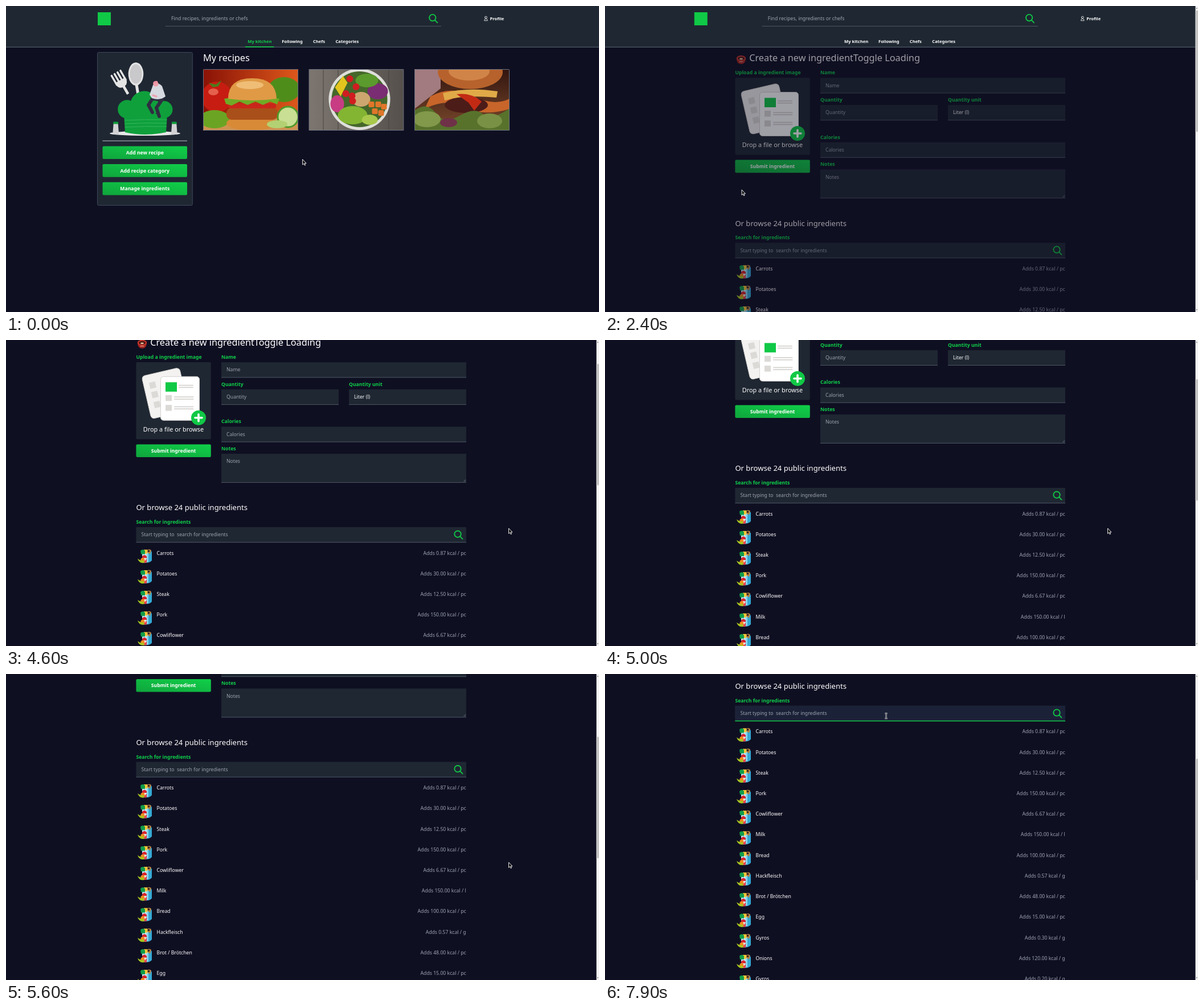
An HTML page for the animation above (8 s loop, 1041 by 538 pixels).

```html
<!DOCTYPE html>
<html lang="en">
<head>
<meta charset="utf-8">
<title>Recipe kitchen</title>
<style>
  html, body { margin: 0; width: 100%; height: 100%; overflow: hidden; background: #0f0f22; }
  #stage { display: block; width: 1041px; height: 538px; }
  text { font: 8.68px "Noto Sans", "Open Sans", sans-serif; fill: #fff; white-space: pre; }
  .bold { font-weight: 700; }
  .nav { font-weight: 700; font-size: 7.6px; }
  .label { font-weight: 700; fill: #0fd04a; }
  .muted { fill: #9ca3af; }
  .title { font-size: 16.27px; }
  .subtitle { font-size: 13.05px; }
  .drop { font-size: 10.85px; }
  .mid { text-anchor: middle; }
  .end { text-anchor: end; }
</style>
</head>
<body>
<svg id="stage" viewBox="0 0 1041 538">
  <defs>
    <linearGradient id="button" x1="0" y1="1" x2="1" y2="0">
      <stop stop-color="#0fa53c"/><stop offset="1" stop-color="#10cf49"/>
    </linearGradient>
    <linearGradient id="warm"><stop stop-color="#8a1206"/><stop offset="1" stop-color="#dd581b"/></linearGradient>
    <linearGradient id="wood"><stop stop-color="#7d7670"/><stop offset="1" stop-color="#55504c"/></linearGradient>
    <linearGradient id="dusk" x2="0" y2="1"><stop stop-color="#32150f"/><stop offset="1" stop-color="#7c4a2c"/></linearGradient>

    <g id="lens" fill="none" stroke="#10c946" stroke-width="1.8" stroke-linecap="round">
      <circle r="5.7"/><path d="M4.2 4.2L8.5 8.7"/>
    </g>

    <g id="food">
      <path d="M13 4L22 1 25 5V20Q22 24 16 24Z" fill="#35a9d4"/>
      <path d="M16 5H19V23H16Z" fill="#8ad3ea"/>
      <path d="M16 2Q20 -1 24 2L22 9 17 6Z" fill="#b9803f"/>
      <circle cx="19.5" cy="3.5" r="1.8" fill="#33231f"/>
      <path d="M8 6H16V24H8Z" fill="#bfe6f2"/>
      <path d="M11 1H17V8H11Z" fill="#f3c93a"/>
      <path d="M5 3Q9 -1 13 3V9H6Z" fill="#119c4a"/>
      <path d="M8 13Q12 8 16 13V16H8Z" fill="#d9232e"/>
      <path d="M8 18H16V24H8Z" fill="#e8404a"/>
      <path d="M10 16H14V20H10Z" fill="#fff"/>
      <circle cx="9" cy="19" r="3.6" fill="#ef8b22"/>
      <path d="M0 17Q5 21 11 20L12 24Q3 26 0 17Z" fill="#a8c520"/>
    </g>

    <g id="arrow"><path d="M0 0V9.4L2.2 7.4 3.7 10.6 5.1 10 3.7 6.9H6.5Z" fill="#111" stroke="#fff" stroke-width=".9"/></g>
    <g id="beam" fill="none">
      <path d="M-2 -4.5H2M0 -4.5V4.5M-2 4.5H2" stroke="#eee" stroke-width="2"/>
      <path d="M-1.8 -4.5H1.8M0 -4.5V4.5M-1.8 4.5H1.8" stroke="#222" stroke-width=".7"/>
    </g>
    <g id="hand"><path d="M-1 1Q0 -.6 1 1V4.5L5 5.2Q6 5.6 5.8 7L5 10.5H-.5L-3.3 6.6Q-3 5.2 -1 6.6Z" fill="#111" stroke="#fff" stroke-width=".9"/></g>
  </defs>

  <rect width="1041" height="538" fill="#0f0f22"/>
  <g id="header"></g>
  <g id="kitchen"></g>
  <g id="form"></g>
  <g id="scrollbar">
    <rect x="1036.5" width="4.5" height="538" fill="#f3f3f3"/>
    <rect id="thumb" x="1036.5" width="4.5" height="213" fill="#c4c4c4"/>
    <path d="M1037.6 4.6L1038.8 3 1040 4.6ZM1037.6 533.4L1038.8 535 1040 533.4Z" fill="#444"/>
  </g>
  <use id="cursor" href="#arrow"/>
</svg>

<script>
const $ = id => document.getElementById(id);
const PANEL = '#1f2732', LINE = '#4b5563';

const text = (x, y, str, cls = '') => `<text x="${x}" y="${y}" class="${cls}">${str}</text>`;
const rect = (x, y, w, h, fill, more = '') =>
  `<rect x="${x}" y="${y}" width="${w}" height="${h}" fill="${fill}" ${more}/>`;
const oval = (x, y, rx, ry, fill, more = '') =>
  `<ellipse cx="${x}" cy="${y}" rx="${rx}" ry="${ry}" fill="${fill}" ${more}/>`;
const dot = (x, y, r, fill, more) => oval(x, y, r, r, fill, more);
const path = (d, fill, more = '') => `<path d="${d}" fill="${fill}" ${more}/>`;
const stroke = (d, color, w) => path(d, 'none', `stroke="${color}" stroke-width="${w}" stroke-linecap="round" stroke-linejoin="round"`);
const button = (x, y, w, str) =>
  rect(x, y, w, 22.6, 'url(#button)', 'rx="2"') + text(x + w / 2, y + 14.6, str, 'bold mid');
const field = (x, y, w, h, str, cls = 'muted', id = 'f' + y + x) =>
  `<g id="${id}">${rect(x, y, w, h, PANEL)}${rect(x, y + h - 1, w, 1, LINE)}</g>` + text(x + 9, y + 16.4, str, cls);
const lens = (x, y) => `<use href="#lens" x="${x}" y="${y}"/>`;

function headerArt() {
  const links = [['My kitchen', 424.3], ['Following', 484.2], ['Chefs', 539], ['Categories', 578.5]];
  return rect(-5, 0, 1060, 72, '#1f2832') + rect(-5, 71.7, 1060, 1.3, LINE) +
    rect(161, 11, 23, 23, '#10c946') +
    text(290, 24.7, 'Find recipes, ingredients or chefs', 'muted') +
    rect(280, 35, 484, 1, LINE) + lens(748.8, 20.6) +
    stroke('M839.7 25.4Q839.7 22.4 842.5 22.4T845.3 25.4ZM840.6 20A1.9 1.9 0 1 0 844.4 20 1.9 1.9 0 1 0 840.6 20Z', '#fff', .8) +
    text(849.5, 24.8, 'Profile', 'nav') +
    links.map(([str, x], i) => `<g ${i ? '' : 'id="active"'}>${text(x, 65, str, 'nav')}</g>`).join('') +
    `<g id="underline">${rect(420, 71, 50.5, 1.6, '#10c946')}</g>`;
}

function hatArt() {
  const shaker = x => path(`M${x - 4} 207H${x + 4}L${x + 5.5} 226H${x - 5.5}Z`, '#d2d2d4') +
    rect(x - 4.5, 203.5, 9, 4, '#0f9d3b', 'rx="1.5"');
  const tines = [0, 6, 12, 18].map(x => rect(x, 0, 3.4, 22, '#e4e4e4', 'rx="1.7"')).join('');
  return oval(244, 224, 62, 4, '#e6e6e6') +
    `<g transform="translate(183 122) rotate(-30)">${tines}${path('M0 16H21.4Q21 28 13 29L13 44H8.4V29Q0 28 0 16Z', '#e4e4e4')}</g>` +
    stroke('M229 138L232 156', '#e4e4e4', 5) + oval(228, 119.5, 13.3, 20.3, '#e4e4e4') + oval(228, 119.5, 10.5, 17, '#c9c9cb') +
    dot(212.5, 181.5, 16.3, '#0fa03c') + dot(277.5, 182, 15, '#0fa03c') + dot(243, 174.5, 25, '#0fa03c') +
    path('M207 190H283L281 222Q244 230 209 222Z', '#0fa03c') +
    [201, 207, 213].map(y => stroke(`M209 ${y}Q244 ${y - 2} 282 ${y - 1}`, '#45c268', .7)).join('') +
    stroke('M274 165L257 163 250 174 257 187M273 166L264 179 269 194', '#2f2e41', 6) +
    path('M258 139Q266 132 274 141L280 159Q270 167 256 162L252 156Z', '#d6d9df') +
    dot(263, 137, 4.6, '#eda0ac') + path('M258 137Q258 131 266 132L266 135Z', '#ef8fa0') +
    stroke('M258 157L264 159', '#eda0ac', 3) + shaker(192.7) + shaker(295.3);
}

const burger = rect(0, 0, 167, 108, 'url(#warm)') + rect(0, 86, 167, 22, '#cf9350') +
  dot(24, 49, 27, '#c71c11') + oval(18, 40, 9, 6, '#e5604c') + path('M10 24L22 27 32 20 27 30 17 32Z', '#4b7c1c') +
  oval(142, 36, 28, 22, '#4f8d1b') + oval(20, 88, 27, 16, '#6ba423') +
  oval(85, 95, 44, 13, '#d88a36') + rect(41, 68, 90, 21, '#a94f1a', 'rx="9"') + rect(44, 60, 84, 9, '#c9261a', 'rx="4"') +
  path('M37 52Q85 44 134 52L130 62 118 57 105 63 92 57 78 63 64 57 50 64 40 61Z', '#70ab27') +
  path('M44 52Q44 16 86 16T129 52Q86 58 44 52Z', '#e09a46') + oval(82, 28, 24, 7, '#efbd76') +
  dot(149, 84, 18, '#c9df93', 'stroke="#4f9a2a" stroke-width="3"') + oval(130, 97, 18, 7, '#b3d172');

const bowl = rect(0, 0, 167, 108, 'url(#wood)') +
  [25, 51, 78, 104, 140].map(x => rect(x, 0, 1, 108, '#4a4541')).join('') +
  dot(89, 53, 54, '#dfdfda') + dot(89, 53, 49, '#45672a') +
  path('M46 32L60 12 68 24 56 48Z', '#e3c51d') + oval(50, 61, 12, 15, '#c73c83') +
  oval(121, 39, 18, 14, '#7a2d72') + oval(102, 20, 20, 12, '#5b9a2c') + oval(92, 53, 16, 13, '#cda66f') +
  [[72, 17], [83, 31], [65, 43], [76, 47], [77, 56]].map(([x, y]) => dot(x, y, 6, '#d11d20')).join('') +
  [[110, 62], [122, 62], [132, 66], [116, 74], [127, 77]].map(([x, y]) => rect(x - 5, y - 5, 10, 10, '#e0762a', 'rx="2"')).join('') +
  oval(77, 81, 26, 16, '#83b532') + oval(107, 89, 14, 9, '#a8c94c');

const bacon = rect(0, 0, 167, 108, 'url(#dusk)') + path('M0 0H46V34L0 70Z', '#a27b80') +
  oval(98, 5, 57, 30, '#b7622c') + oval(96, 4, 36, 16, '#d18447') +
  path('M28 48Q65 28 102 47T167 52V70Q120 84 88 67T18 70Z', '#c8652a') +
  path('M50 42Q94 31 146 39L144 50Q90 45 53 55Z', '#e0aa48') +
  oval(91, 63, 38, 14, '#4c1c18') + path('M74 44Q100 41 118 57L105 73 95 59Z', '#c32a14') +
  path('M0 73Q22 56 37 77T79 82 120 79 167 69V108H0Z', '#58722c') +
  oval(22, 88, 24, 14, '#82984a') + oval(132, 91, 22, 13, '#799145') + oval(60, 94, 15, 8, '#6f3147');

function kitchenArt() {
  const photo = (art, i) => `<svg x="${346 + i * 185.5}" y="111" width="167" height="108">${art}` +
    rect(.5, .5, 166, 107, 'none', 'stroke="#6b7280" rx="1"') + '</svg>';
  return rect(160.5, 81.5, 166.8, 269, PANEL, 'rx="2" stroke="#3d4858"') + hatArt() +
    rect(169.5, 236.6, 148.5, 1, '#c3c7cd') +
    ['Add new recipe', 'Add recipe category', 'Manage ingredients']
      .map((str, i) => button(169.5, 246.4 + i * 31.7, 148.5, str)).join('') +
    text(346, 97, 'My recipes', 'title') + [burger, bowl, bacon].map(photo).join('');
}

function filesArt() {
  const lines = (x, y, w) => rect(x, y, w, 1.7, '#d5d3d0', 'rx=".8"') + rect(x, y + 3.7, w, 1.7, '#d5d3d0', 'rx=".8"');
  return `<g transform="translate(238 151) rotate(-13)">${rect(0, 0, 68, 77, '#f3f2f0', 'rx="6" stroke="#d5d3d0"')}` +
    [14, 31, 49].map(y => rect(10, y, 11, 11, '#dcdad7')).join('') + '</g>' +
    rect(271.5, 151.5, 68, 77, '#fff', 'rx="5" stroke="#d5d3d0"') +
    rect(280, 161.5, 20, 16.5, '#10c946') + lines(303, 166, 26) +
    [184, 201.3].map(y => rect(280, y, 11, 10.5, '#dcdad7') + lines(295, y + 2.5, 34.5)).join('') +
    dot(338, 224, 13, '#10c946') + stroke('M332 224H344M338 218V230', '#fff', 3.6);
}

const foods = `Carrots,0.87,pc Potatoes,30.00,pc Steak,12.50,pc Pork,150.00,pc Cowliflower,6.67,pc Milk,150.00,l
  Bread,100.00,pc Hackfleisch,0.57,g Brot_/_Brötchen,48.00,pc Egg,15.00,pc Gyros,0.30,g Onions,120.00,g Gyros,0.20,g`
  .split(/\s+/).map(item => item.replace(/_/g, ' ').split(','));

function formArt() {
  const rows = foods.map(([name, kcal, unit], i) => {
    const y = 464.8 + i * 36.22;
    return `<use href="#food" x="231" y="${y - 10}"/>` + text(264.5, y, name) +
      text(807.7, y, `Adds ${kcal} kcal / ${unit}`, 'muted end');
  });
  return path('M231 92Q231 102 239 102T247 92Z', '#a5231f') + oval(239, 92, 8.2, 5, '#c8372c') +
    oval(239, 92, 6, 3, '#4a1512') + oval(239, 93, 3, 1.4, '#e8c79b') + stroke('M236 98H242', '#e9b8a6', 1) +
    text(253.2, 97, 'Create a new ingredientToggle Loading', 'title') +
    text(228.4, 120.4, 'Upload a ingredient image', 'label') +
    rect(228.4, 126.3, 131.4, 135.5, PANEL, 'rx="2"') + filesArt() +
    text(294, 248.4, 'Drop a file or browse', 'drop mid') + button(228.4, 270.6, 131.4, 'Submit ingredient') +
    text(378, 120.4, 'Name', 'label') + field(378, 126.3, 430, 27.2, 'Name') +
    text(378, 168, 'Quantity', 'label') + field(378, 174, 206, 27.2, 'Quantity') +
    text(602, 168, 'Quantity unit', 'label') + field(602, 174, 206, 27.2, 'Liter (l)', '') +
    text(378, 233.6, 'Calories', 'label') + field(378, 239.6, 430, 27.2, 'Calories') +
    text(378, 281.2, 'Notes', 'label') + field(378, 287.2, 430, 51, 'Notes') +
    stroke('M803.5 336L806.8 332.7M805.5 336L806.8 334.7', '#8b929c', .6) +
    text(228.4, 386.6, 'Or browse 24 public ingredients', 'subtitle') +
    text(228.4, 410.4, 'Search for ingredients', 'label') +
    field(228.4, 416.2, 579.6, 27.2, 'Start typing to  search for ingredients', 'muted', 'search') +
    `<g id="focus">${rect(228.4, 416.2, 579.6, 26, '#1b2238')}${rect(228.4, 442.2, 579.6, 1.5, '#10c946')}` +
    text(237.4, 432.6, 'Start typing to  search for ingredients', 'muted') + '</g>' +
    `<g id="caret">${rect(237, 424.6, .7, 10, '#fff')}</g>` + lens(793, 428.4) + rows.join('');
}

$('header').innerHTML = headerArt();
$('kitchen').innerHTML = kitchenArt();
$('form').innerHTML = formArt();

const clamp = v => Math.max(0, Math.min(1, v));

// Piecewise linear track of [time, ...values].
function sample(keys, t) {
  const i = keys.findIndex(k => k[0] > t);
  if (i < 0) return keys.at(-1).slice(1);
  if (!i) return keys[0].slice(1);
  const a = keys[i - 1], b = keys[i], p = (t - a[0]) / (b[0] - a[0]);
  return a.slice(1).map((v, j) => v + (b[j + 1] - v) * p);
}

const pointer = [
  [600, 520.6, 269.6], [700, 500, 277], [800, 440, 303], [900, 404.5, 315], [1000, 404.5, 315],
  [1100, 380, 317], [1200, 310, 321], [1300, 255, 323], [1400, 241, 324], [1500, 241, 324],
  [1600, 243, 323], [1700, 240, 323], [3400, 240, 323], [3500, 262, 323], [3900, 677.5, 328.5],
  [4200, 872, 331], [4300, 882.5, 331], [6600, 882.5, 331], [6900, 590, 125], [7100, 493.5, 73.8]];
const wheel = [
  [4200, 0], [4300, 8], [4400, 41], [4500, 71], [4600, 87.2], [4700, 87.2], [4800, 95], [4900, 127],
  [5000, 156.2], [5100, 173], [5200, 181], [5300, 207], [5400, 234], [5500, 254], [5600, 261.7], [5700, 262.2],
  [6200, 262.2], [6300, 270], [6400, 307], [6500, 338], [6600, 356], [6700, 360.4]];

function draw(time) {
  const t = Math.floor(time % 8000 / 100) * 100;
  const opened = t >= 2000;
  const [x, y] = sample(pointer, t), [scroll] = sample(wheel, t);
  const show = (id, on) => $(id).setAttribute('opacity', +on);

  show('kitchen', !opened);
  show('underline', !opened);
  show('scrollbar', opened);
  show('form', opened && clamp((t - 2000) / 600) ** 1.25);
  show('focus', clamp((t - 7100) / 400));
  show('caret', t >= 7200 && t < 7900);
  $('active').firstChild.style.fill = opened ? '#fff' : '#0fd04a';
  $('header').setAttribute('transform', `translate(${opened ? -4.2 : 0} ${-scroll})`);
  $('form').setAttribute('transform', `translate(0 ${-scroll})`);
  $('thumb').setAttribute('y', 8 + scroll * .392);

  const within = (x0, y0, y1) => x > x0 && x < 808 && y + scroll > y0 && y + scroll < y1;
  const typing = opened && (within(378, 287, 338) || within(228, 416, 443));
  const shape = typing ? 'beam' : !opened && x < 318 ? 'hand' : 'arrow';
  $('cursor').setAttribute('href', '#' + shape);
  $('cursor').setAttribute('transform', `translate(${x} ${y})`);
}

const start = performance.now();
(function frame() {
  draw(performance.now() - start);
  requestAnimationFrame(frame);
})();
</script>
</body>
</html>
```
